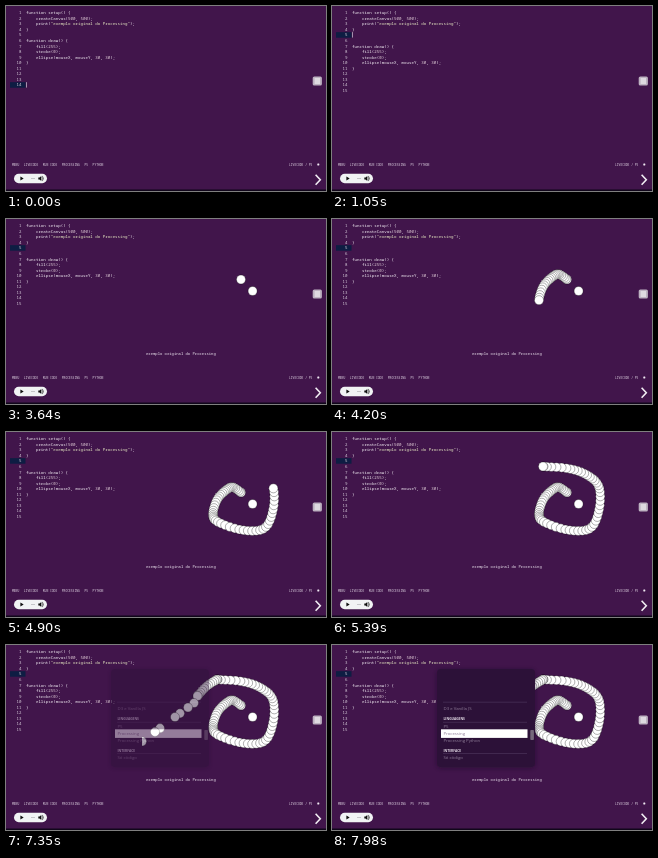
Recreate the animation shown at these times as an HTML page. Size 320 by 185 pixels, loop 8 s.

```html
<!DOCTYPE html>
<html lang="pt">
<head>
<meta charset="utf-8">
<title>Livecode</title>
<style>
html, body { margin: 0; width: 100%; height: 100%; overflow: hidden; background: #41154b; }
svg { display: block; width: 100vw; height: 100vh; }
text { white-space: pre; font-family: "Noto Sans Mono", "DejaVu Sans Mono", monospace; }
.code, .num { font-size: 4.13px; font-weight: 500; fill: #f4eff5; }
.num { font-weight: 400; fill: #d9cfdc; text-anchor: end; }
.str { fill: #e9ecc4; }
.val { fill: #e6d3dc; }
.nav { font-size: 3px; font-weight: 500; fill: #e3d8e6; }
.log { font-size: 3.88px; fill: #eee6f0; }
.item, .head { font: 400 4.3px "Open Sans", "Noto Sans", sans-serif; fill: #8f7d98; }
.head { font-size: 3.3px; font-weight: 700; fill: #e9e1ec; }
</style>
</head>
<body>
<svg viewBox="0 0 320 185" preserveAspectRatio="none">
  <defs>
    <clipPath id="sketch"><rect x="136" width="165" height="140"/></clipPath>
    <filter id="soft" x="-20%" y="-20%" width="140%" height="140%"><feGaussianBlur stdDeviation="2"/></filter>
  </defs>
  <rect width="320" height="185" fill="#41154b"/>
  <rect y="183.5" width="320" height="1.5" fill="#10061a"/>
  <rect id="active" x="4" width="15.5" height="5.56" fill="#0e1d43"/>
  <g id="gutter"></g>
  <g id="code"></g>
  <rect id="caret" x="20" width=".6" height="5.4" fill="#e9e4ee"/>
  <g id="dots" clip-path="url(#sketch)" fill="#fff" stroke="#000" stroke-width=".32"></g>
  <text id="log" class="log" x="140" y="135.5">exemplo original do Processing</text>

  <g id="nav"></g>
  <rect x="311.3" y="157.5" width="2" height="2" rx=".4" fill="#f0e9f2"/>
  <path d="M309.6 168.8l4.7 5-4.7 5" fill="none" stroke="#f1edf3" stroke-width="1.6"/>

  <rect x="8" y="167.8" width="33" height="9.4" rx="4.7" fill="#f1f3f4"/>
  <path d="M14.4 170.5v4l3.3-2z" fill="#111"/>
  <path d="M25 172.5h4" stroke="#b4b4b8" stroke-width=".7"/>
  <path d="M32.3 171.6h1.2l1.8-1.7v5.2l-1.8-1.7h-1.2z" fill="#111"/>
  <path d="M36 171.2q1.1 1.3 0 2.6m.3-3.9q2.4 2.6 0 5.2" fill="none" stroke="#111" stroke-width=".55"/>

  <rect x="306.7" y="70.5" width="9.2" height="9" rx="1.6" fill="#bdb2c1"/>
  <path d="M308.6 73h5.4m-5.4 2h5.4m-5.4 2h5.4" stroke="#fff" stroke-width="1.1"/>

  <g id="menu">
    <rect x="105" y="25" width="98" height="98" rx="4" fill="#160820" opacity=".5" filter="url(#soft)"/>
    <rect x="105" y="24" width="98" height="98" rx="4" fill="#2c1138"/>
    <path d="M111 57.2h84M111 77.3h84M111 108.5h84" stroke="#69547a" stroke-width=".35"/>
    <rect x="109" y="84.3" width="86.5" height="8.6" fill="#fff"/>
    <rect x="198.3" y="85" width="3.6" height="10" rx=".8" fill="#75697b"/>
    <g id="items"></g>
  </g>
</svg>
<script>
const LOOP = 8000, STEP = 70, ROW = 5.56;
const $ = id => document.getElementById(id);

function add(parent, tag, attrs, text = "") {
  const el = document.createElementNS("http://www.w3.org/2000/svg", tag);
  for (const k in attrs) el.setAttribute(k, attrs[k]);
  el.textContent = text;
  $(parent).append(el);
  return el;
}
const show = (el, on) => { el.style.visibility = on ? "visible" : "hidden"; };
const rowTop = n => 3.9 + (n - 1) * ROW;
const baseline = n => rowTop(n) + 4.25;

// Editor
const rows = `function setup() {
    createCanvas(500, 500);
    print("exemplo original do Processing");
}

function draw() {
    fill(255);
    stroke(0);
    ellipse(mouseX, mouseY, 30, 30);
}`.split("\n").map(line => {
  const el = add("code", "text", { class: "code", x: 20 });
  el.innerHTML = line.replace(/("[^"]*")|\b\d+\b/g, (m, str) =>
    `<tspan class="${str ? "str" : "val"}">${m}</tspan>`);
  return el;
});
const nums = Array.from({ length: 15 }, (_, i) =>
  add("gutter", "text", { class: "num", x: 15.4, y: baseline(i + 1) }, i + 1));

// Footer links, laid out by character width
let navX = 6;
for (const s of ["MENU", "LIVECODE", "RUN CODE", "PROCESSING", "P5", "PYTHON"]) {
  add("nav", "text", { class: "nav", x: navX, y: 159.6 }, s);
  navX += s.length * 1.8 + 4.6;
}
add("nav", "text", { class: "nav", x: 283, y: 159.6 }, "LIVECODE / P5");

// Menu entries; capitals are headings
let itemY = 58;
for (const s of ["D3 e Vanilla JS", "LINGUAGENS", "P5", "Processing",
                 "Processing Python", "INTERFACE", "Só código"]) {
  const head = s.length > 2 && s === s.toUpperCase();
  itemY += head ? 9.9 : 7.3;
  add("items", "text", { class: head ? "head" : "item", x: 111.5, y: itemY }, s);
}

// Drawing: the pointer passes one key point every BEAT ms
const BEAT = 140, TICK = 25;
const spiral = [[235, 60.5], [226.5, 55.2], [219, 59], [211, 68], [207, 82], [212, 90],
                [236, 98], [258, 96.5], [267, 78], [267, 55], [255, 43], [236, 36.5], [211, 34.5]];
const tail = [[211, 34.5], [201, 41], [191.5, 51]];

function spline(p, pos) {
  const i = Math.min(Math.floor(pos), p.length - 2), u = pos - i;
  const at = k => p[Math.max(0, Math.min(p.length - 1, k))];
  return [0, 1].map(c => {
    const [a, b, d, e] = [-1, 0, 1, 2].map(k => at(i + k)[c]);
    return b + u / 2 * (d - a + u * (2 * a - 5 * b + 4 * d - e + u * (3 * (b - d) + e - a)));
  });
}

const dots = [];
const dot = (t, cx, cy) => dots.push({ t, el: add("dots", "circle", { cx, cy, r: 4.55 }) });

function stroke(start, points) {
  const span = (points.length - 1) * BEAT;
  for (let t = 0; t <= span; t += TICK) dot(start + t, ...spline(points, t / BEAT));
  dot(start + span, ...points[points.length - 1]);
}

dot(3570, 246.6, 72);
stroke(3640, spiral);
stroke(5600, tail);
// Quick uneven swipe out of the canvas
[188, 182, 174, 169, 154, 149, 136].forEach((x, i) =>
  dot(6160 + i * 20, x, 58 + (188 - x) * .74));

// [time, active line, caret shown]
const caretSteps = [[0, 14, 1], [70, 14, 0], [490, 4, 1], [700, 5, 1], [1330, 5, 0], [1680, 5, 1], [1960, 5, 0]];

function draw(now) {
  const t = Math.floor((now % LOOP) / STEP) * STEP;
  const [, line, on] = caretSteps.filter(s => s[0] <= t).pop();
  const shift = t >= 700 ? 1 : 0;

  rows.forEach((el, i) => el.setAttribute("y", baseline(i + 1 + (i > 4 ? shift : 0))));
  show(nums[14], shift);
  $("active").setAttribute("y", rowTop(line));
  $("caret").setAttribute("y", rowTop(line));
  $("caret").setAttribute("x", line === 4 ? 22.5 : 20);
  show($("caret"), on);

  for (const d of dots) show(d.el, d.t <= t);
  show($("log"), t >= 3570);

  const k = Math.max(0, Math.min(1, (t - 7280) / 280));
  show($("menu"), k > 0);
  $("menu").style.opacity = 1 - (1 - k) ** 2;
}

const start = performance.now();
function frame() {
  draw(performance.now() - start);
  requestAnimationFrame(frame);
}
frame();
</script>
</body>
</html>
```
